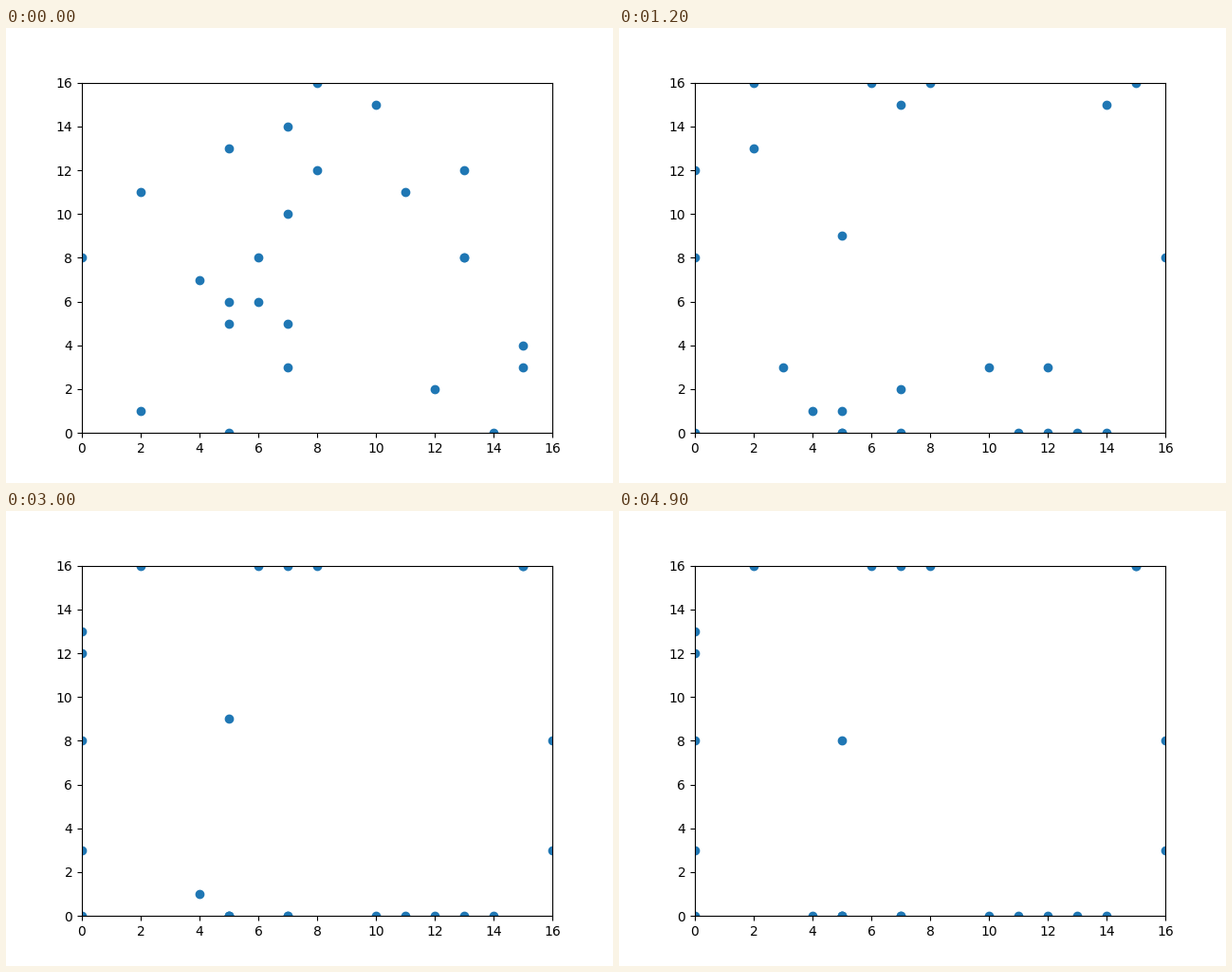
Animation, 640 px wide and 480 px high, one loop 5 s. Source, as a matplotlib script:

```python
import matplotlib.pyplot as plt
import numpy as np
from matplotlib.animation import FuncAnimation

SIZE = 16
FRAMES = 50
TIME = np.arange(FRAMES)
LEFT, RIGHT, UP, DOWN = (-1, 0), (1, 0), (0, 1), (0, -1)


def walk(start, heading, wait=FRAMES, climb=0, reach=FRAMES, time=TIME):
    """Go one cell per frame inside the square.

    After `wait` steps the walker climbs `climb` cells, then resumes its
    heading; after `reach` steps along the heading it only climbs.
    """
    ahead = np.minimum(time - np.clip(time - wait, 0, climb), reach)
    cells = start + np.outer(ahead, heading) + np.outer(time - ahead, UP)
    return np.clip(cells, 0, SIZE)


def bounce(start, heading, steps):
    """Walk `steps` cells, then keep stepping back and forth."""
    return walk(start, heading, time=np.where(TIME > steps, steps - (TIME - steps) % 2, TIME))


def column(x, *rows):
    return [(x, y) for y in rows]


falling = [*column(0, 8), *column(5, 0, 6, 13), *column(7, 5, 14),
           *zip(range(10, 15), (15, 11, 2, 8, 0))]
rising = [(2, 11), (6, 6), (7, 3), (8, 16), (15, 4)]
leftward = [(6, 8), (8, 12), (15, 3)]

paths = np.array([
    *(walk(cell, DOWN) for cell in falling),
    *(walk(cell, UP) for cell in rising),
    *(walk(cell, LEFT) for cell in leftward),
    walk((13, 8), RIGHT),
    walk((13, 12), LEFT, wait=3, climb=1),
    walk((2, 1), RIGHT, wait=3, climb=2),
    walk((7, 10), RIGHT, wait=7, climb=5, reach=8),
    bounce((5, 5), UP, steps=4),
    bounce((4, 7), DOWN, steps=7),
])

fig, ax = plt.subplots(figsize=(6.4, 4.8), dpi=100)
ax.set(xlim=(0, SIZE), ylim=(0, SIZE))
dots, = ax.plot([], [], "o", color="tab:blue")


def update(frame):
    dots.set_data(*paths[:, frame].T)
    return dots,


anim = FuncAnimation(fig, update, frames=FRAMES, interval=100, repeat=True, repeat_delay=0)
plt.show()
```
